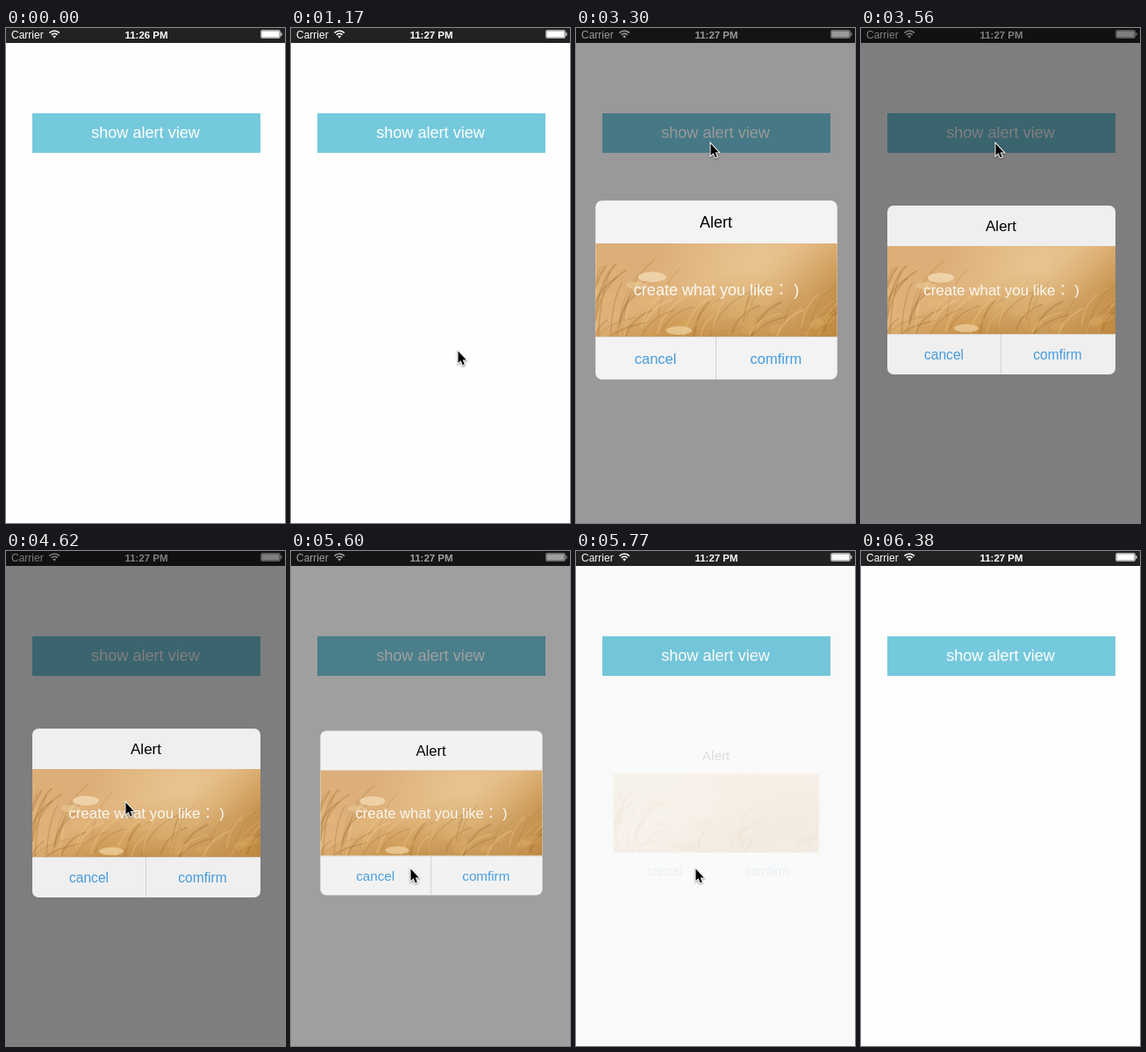
An HTML page with a canvas for the animation above (7.09 s loop, 318 by 563 pixels).

```html
<!DOCTYPE html>
<html lang="en">
<head>
<meta charset="utf-8">
<title>Alert view</title>
<style>
html, body { margin: 0; width: 100%; height: 100%; overflow: hidden; background: #fefefe; }
canvas { display: block; width: 318px; height: 563px; }
</style>
</head>
<body>
<canvas id="stage"></canvas>
<script>
const W = 318, H = 563, LOOP = 7090;
const FONT = '"Liberation Sans", "Noto Sans CJK JP", "Noto Sans CJK", sans-serif';
const canvas = document.getElementById('stage');
const ctx = canvas.getContext('2d');
const dpr = window.devicePixelRatio || 1;
canvas.width = W * dpr;
canvas.height = H * dpr;

const easeIn = u => Math.pow(u, 1.4);
const easeOut = u => 1 - Math.pow(1 - u, 1.5);
const easeBoth = u => u * u * (3 - 2 * u);

// Number of discrete updates done at time t, between first and last.
function stepsDone(t, first, last, n) {
  if (t < first) return 0;
  return Math.min(n, 1 + Math.floor((t - first + 10) / ((last - first) / (n - 1))));
}

// Pointer moves: first and last update, count, start, end, easing.
const moves = [
  [270, 450, 3, [223, 541], [190.5, 367.5], easeOut],
  [1700, 2330, 8, [190.5, 367.5], [144.5, 195.5], easeBoth],
  [2410, 2850, 6, [144.5, 195.5], [153.5, 131.5], easeBoth],
  [4190, 4620, 6, [153.5, 131.5], [136.5, 286], easeIn],
  [4700, 4880, 3, [136.5, 286], [136.5, 344], easeOut],
  [4970, 5060, 2, [136.5, 344], [136.5, 361.5], easeOut],
  [6120, 6290, 3, [136.5, 361.5], [248, 550], easeIn]
];

function pointerAt(t) {
  if (t < 270 || t >= 6380) return null;
  const [first, last, n, a, b, ease] = moves.filter(m => t >= m[0]).pop();
  const u = ease(stepsDone(t, first, last, n) / n);
  return [a[0] + (b[0] - a[0]) * u, a[1] + (b[1] - a[1]) * u];
}

function alertAt(t) {
  if (t < 3300 || t >= 5860) return null;
  if (t < 5600) {
    const p = [0, 0.8, 0.94, 0.985, 1][stepsDone(t, 3300, 3560, 4)];
    return { dim: 0.5 * p, scale: 1.3 - 0.3 * p, alpha: 1 };
  }
  const p = [0, 0.25, 0.73, 0.96, 1][stepsDone(t, 5600, 5860, 4)];
  return { dim: 0.5 * (1 - p), scale: 1 - 0.105 * p, alpha: 1 - p * p * p };
}

function rect(color, x, y, w, h) {
  ctx.fillStyle = color;
  ctx.fillRect(x, y, w, h);
}

function label(str, x, y, size, color, align = 'center', weight = 'normal') {
  ctx.font = `${weight} ${size}px ${FONT}`;
  ctx.textAlign = align;
  ctx.fillStyle = color;
  ctx.fillText(str, x, y);
}

function roundRect(x, y, w, h, r) {
  ctx.beginPath();
  ctx.moveTo(x + r, y);
  ctx.arcTo(x + w, y, x + w, y + h, r);
  ctx.arcTo(x + w, y + h, x, y + h, r);
  ctx.arcTo(x, y + h, x, y, r);
  ctx.arcTo(x, y, x + w, y, r);
  ctx.closePath();
}

function ellipse(color, x, y, rx, ry, turn = 0) {
  ctx.fillStyle = color;
  ctx.beginPath();
  ctx.ellipse(x, y, rx, ry, turn, 0, Math.PI * 2);
  ctx.fill();
}

function drawStatusBar(t) {
  rect('#222', 0, 0, W, 17);
  label('Carrier', 6, 11.5, 12, '#fff', 'left');
  label(t < 1170 ? '11:26 PM' : '11:27 PM', 160, 11.5, 11.5, '#fff', 'center', 'bold');

  ctx.strokeStyle = '#fff';
  ctx.lineWidth = 1.6;
  for (const r of [4.6, 7.8]) {
    ctx.beginPath();
    ctx.arc(55.2, 11, r, -Math.PI * 0.76, -Math.PI * 0.24);
    ctx.stroke();
  }
  ctx.fillStyle = '#fff';
  ctx.beginPath();
  ctx.moveTo(55.2, 11.6);
  ctx.arc(55.2, 11.2, 2.5, -Math.PI * 0.78, -Math.PI * 0.22);
  ctx.fill();

  ctx.strokeStyle = '#aaa';
  ctx.lineWidth = 1;
  roundRect(290.5, 2.5, 22, 9, 1.5);
  ctx.stroke();
  rect('#fff', 291.3, 3.3, 20.4, 7.4);
  rect('#ddd', 313.2, 5.3, 1.3, 3.6);
}

function drawField() {
  ctx.save();
  ctx.beginPath();
  ctx.rect(-130, -50, 260, 100);
  ctx.clip();

  const sky = ctx.createLinearGradient(-40, -50, 0, 50);
  sky.addColorStop(0, '#dcae78');
  sky.addColorStop(0.45, '#dfb27a');
  sky.addColorStop(0.75, '#cd9a55');
  sky.addColorStop(1, '#be8840');
  rect(sky, -130, -50, 260, 100);

  const glow = ctx.createRadialGradient(45, -25, 5, 45, -25, 110);
  glow.addColorStop(0, 'rgba(238,206,158,.65)');
  glow.addColorStop(1, 'rgba(238,206,158,0)');
  rect(glow, -130, -50, 260, 100);

  let seed = 17;
  const rnd = () => (seed = (seed * 16807) % 2147483647) / 2147483647;
  ctx.lineCap = 'round';
  for (let i = 0; i < 46; i++) {
    const x = -140 + 270 * Math.pow(rnd(), 1.3);
    const y = 30 + 28 * rnd();
    const lean = 12 + 38 * rnd(), rise = 20 + 58 * rnd() * (x < -40 ? 1 : 0.6);
    ctx.strokeStyle = i % 3 ? 'rgba(156,104,38,.32)' : 'rgba(240,204,132,.36)';
    ctx.lineWidth = 0.7 + 1.8 * rnd();
    ctx.beginPath();
    ctx.moveTo(x, y);
    ctx.quadraticCurveTo(x + lean * 0.2, y - rise * 0.7, x + lean, y - rise);
    ctx.stroke();
  }
  for (let i = 0; i < 12; i++) {
    ellipse('rgba(231,187,112,.22)', -120 + 240 * rnd(), 8 + 40 * rnd(), 6 + 8 * rnd(), 3 + 4 * rnd(), -0.3);
  }
  ellipse('rgba(245,222,184,.75)', -69, -14, 15, 5.5);
  ellipse('rgba(240,211,160,.72)', -40, 43.5, 14, 4.6);
  ellipse('rgba(240,214,166,.45)', -86, -5, 11, 4);
  ctx.restore();
}

function drawAlert({ dim, scale, alpha }) {
  rect(`rgba(0,0,0,${dim})`, 0, 0, W, H);
  ctx.save();
  ctx.translate(160, 298);
  ctx.scale(scale, scale);
  ctx.globalAlpha = alpha;
  roundRect(-130, -96, 260, 192, 7);
  ctx.fillStyle = 'rgba(255,255,255,.88)';
  ctx.fill();
  drawField();
  rect('#cfcfcf', -130, 50, 260, 0.6);
  rect('#cfcfcf', -0.9, 50, 0.9, 46);
  label('Alert', -0.5, -67, 17, '#000');
  label('create what you like： )', 0, 6, 17, 'rgba(255,255,255,.9)');
  label('cancel', -65.5, 79, 15.6, '#459ce0');
  label('comfirm', 64, 79, 15.6, '#459ce0');
  ctx.restore();
}

function drawPointer([x, y]) {
  ctx.save();
  ctx.translate(x, y);
  ctx.beginPath();
  ctx.moveTo(0, 0);
  for (const [px, py] of [[0, 13.6], [3.1, 10.8], [5.2, 15.8], [7.3, 14.9], [5.2, 10.1], [9.3, 9.9]]) {
    ctx.lineTo(px, py);
  }
  ctx.closePath();
  ctx.lineJoin = 'miter';
  ctx.strokeStyle = '#fff';
  ctx.lineWidth = 2;
  ctx.shadowColor = 'rgba(0,0,0,.45)';
  ctx.shadowBlur = 2 * dpr;
  ctx.shadowOffsetY = dpr;
  ctx.stroke();
  ctx.shadowColor = 'transparent';
  ctx.fillStyle = '#000';
  ctx.fill();
  ctx.restore();
}

function draw() {
  const t = performance.now() % LOOP;
  ctx.setTransform(dpr, 0, 0, dpr, 0, 0);
  rect('#fefefe', 0, 0, W, H);
  drawStatusBar(t);
  rect('#75c9dd', 30, 97, 260, 45);
  label('show alert view', 159, 125, 18.1, '#fff');
  const box = alertAt(t);
  if (box) drawAlert(box);
  const tip = pointerAt(t);
  if (tip) drawPointer(tip);
  requestAnimationFrame(draw);
}
draw();
</script>
</body>
</html>
```
